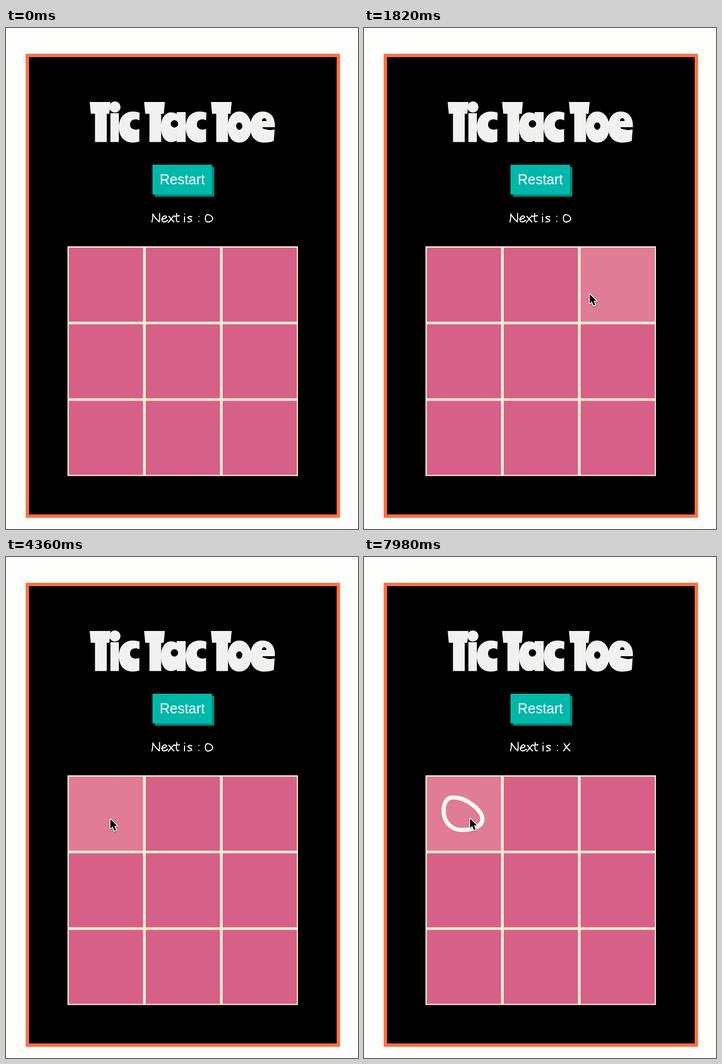
Recreate the animation shown at these times as an HTML page. Size 627 by 894 pixels, loop 8000 ms.

```html
<!DOCTYPE html>
<html lang="en">
<head>
<meta charset="utf-8">
<title>Tic Tac Toe</title>
<style>
  html, body { margin: 0; width: 100%; height: 100%; overflow: hidden; background: #fdfdfb; }
  svg { display: block; width: 627px; height: 894px; }
  .pen { fill: none; stroke: #fff; stroke-width: 1.9; stroke-linecap: round; stroke-linejoin: round; }
  .label { font: 25px "Liberation Sans", Arial, sans-serif; fill: #fff; text-anchor: middle; }
</style>
</head>
<body>
<svg viewBox="0 0 627 894">
  <defs>
    <path id="T" d="M0 132H37L35 153H30.500V203.500H9.500V153H2Z"/>
    <path id="c" d="M37 151Q31 149 25 149C9 149 0 161 0 177C0 193 9 204.500 25 204.500Q31 204.500 36.500 202.500V180C30 183 20 181 20 172.500C20 163 30 161 36.500 165Z"/>
  </defs>

  <rect x="38" y="49" width="554" height="822" stroke="#ff7043" stroke-width="6"/>

  <g fill="#f1f1ef" fill-rule="evenodd" role="img" aria-label="Tic Tac Toe">
    <use href="#T" x="149"/>
    <circle cx="194" cy="141" r="10"/>
    <path d="M186 152H201V203.500H186Z"/>
    <use href="#c" x="201"/>
    <use href="#T" x="246"/>
    <path d="M304 150H320V203.500H304V201C285 210 276 194 276 177C276 157 288 145 304 153ZM300 164.500A6.500 6.500 0 1 0 300.100 164.500Z"/>
    <use href="#c" x="320"/>
    <use href="#T" x="365"/>
    <path d="M415.500 149C402 149 395 162 395 177C395 193 402 204.500 415.500 204.500C429 204.500 437 193 437 177C437 162 429 149 415.500 149ZM415.500 168.500A5.500 6.500 0 1 1 415.400 168.500Z"/>
    <path d="M457 149C443 149 435 161 435 177C435 194 444 204.500 460 204.500Q470 204.500 477 201.500L478.500 181Q468 184 457 179V177H479C480 160 472 149 457 149ZM456 166Q456 161 460 161Q464 161 464 166Z"/>
  </g>

  <path fill="#00897b" d="M265 248H371V301H265Z"/>
  <path fill="#00b8a9" d="M261 244H367V297H261Z"/>
  <text class="label" x="314" y="279">Restart</text>

  <g id="status" class="pen" role="img">
    <path d="M260 346Q262 339 261.500 332Q267 341 273 346Q274 339 273.500 331"/>
    <path d="M277 341Q285 341 286 337Q283 333 279 338Q276 345 281 346Q285 346 288 343"/>
    <path d="M290 336L299 346M299 335L289 347M304 331Q303 340 304 344Q305 347 308 345M300 336L309 335"/>
    <path d="M318 337V346M318 332V332.300M331 337Q326 335 324 338Q325 340 330 342Q333 346 324 346"/>
    <path d="M343.500 336V336.300M343.500 345V345.300"/>
    <path id="nextO" d="M359 333C354 334 354 344 358 346C364 347 369 343 368 339C367 335 362 333 359 333Z"/>
    <path id="nextX" d="M355.500 333Q360 341 366 346M365.500 333Q359 339 354.500 346"/>
  </g>

  <rect x="109.500" y="389.500" width="410.500" height="410" fill="#fdebce"/>
  <g id="board"></g>

  <path id="mark" fill="none" stroke="#fffaf3" stroke-width="7.500" stroke-linejoin="round"
    d="M160 429C147 428 141 440 142 456C143 474 157 488 176 487C196 487 212 479 211 467C210 452 183 429 160 429Z"/>

  <g id="cursor" stroke-linejoin="round">
    <path id="arrow" d="M1 2V18.500L4.800 15L8 22.300L11 21L7.900 13.800H13Z" fill="#000" stroke="#fff" stroke-width="3"
      paint-order="stroke" style="filter:drop-shadow(0 1px 1px #0006)"/>
  </g>
</svg>
<script>
const LOOP = 8000, ENTER = 180, CLICK = 6400;
const BASE = '#d66088', HOVER = '#e07c95';
const $ = id => document.getElementById(id);

// time, x, y of the pointer tip
const path = [
  [160, -10, 570], [500, 396, 474], [1700, 396, 474], [1820, 401, 473],
  [2100, 401, 473], [2540, 390, 471], [2960, 390, 471], [3060, 380, 469],
  [3360, 190, 467], [4220, 185, 466], [4360, 185, 466], [4700, 182, 466],
  [5160, 186, 465], [5400, 188, 465], [LOOP, 188, 465]
];

const cells = [];
for (let i = 0; i < 9; i++) {
  const cell = document.createElementNS('http://www.w3.org/2000/svg', 'rect');
  const box = { x: 112 + i % 3 * 137, y: 392 + Math.floor(i / 3) * 136.7, width: 132, height: 132 };
  for (const key in box) cell.setAttribute(key, box[key]);
  $('board').append(cell);
  cells.push(cell);
}

function pointer(t) {
  const i = Math.max(1, path.findIndex(p => p[0] >= t));
  const [t0, x0, y0] = path[i - 1], [t1, x1, y1] = path[i];
  const p = Math.min(1, Math.max(0, (t - t0) / (t1 - t0)));
  const e = p * p * (3 - 2 * p);
  return [x0 + (x1 - x0) * e, y0 + (y1 - y0) * e];
}

const show = (id, on) => $(id).setAttribute('visibility', on ? 'visible' : 'hidden');

function draw(t) {
  const [x, y] = pointer(t);
  const col = Math.floor((x - 105) / 137), row = Math.floor((y - 389) / 137);
  const inside = t >= ENTER && col >= 0 && col < 3 && row >= 0 && row < 3;
  const over = inside ? row * 3 + col : -1;
  cells.forEach((cell, i) => cell.setAttribute('fill', i === over ? HOVER : BASE));

  const played = t >= CLICK;
  show('cursor', t >= ENTER);
  show('mark', played);
  show('nextX', played);
  show('nextO', !played);
  $('status').setAttribute('transform', `translate(${played ? 1 : 0})`);
  $('status').setAttribute('aria-label', `Next is : ${played ? 'X' : 'O'}`);
  $('cursor').setAttribute('transform', `translate(${x.toFixed(1)} ${y.toFixed(1)})`);
}

const start = performance.now();
function tick(now) {
  draw(Math.max(0, now - start) % LOOP);
  requestAnimationFrame(tick);
}
draw(0);
requestAnimationFrame(tick);
</script>
</body>
</html>
```
